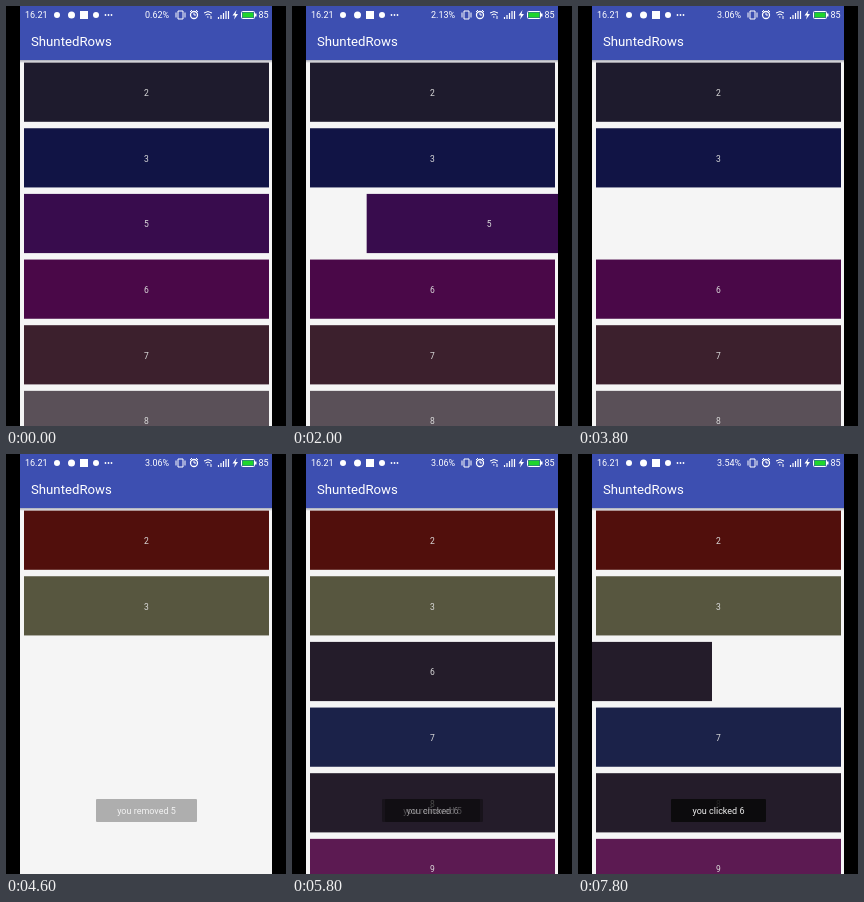
These frames come from a looping animation (280x420 px, 8000 ms). An HTML page:

```html
<!DOCTYPE html>
<html lang="en">
<head>
<meta charset="utf-8">
<style>
  html, body { margin: 0; width: 100%; height: 100%; overflow: hidden; background: #000; }
  svg { display: block; width: 100vw; height: 100vh; font-family: Roboto, sans-serif; }
  .mid { text-anchor: middle; }
  .row text { font-size: 8.5px; fill: #ddd; }
  .toast text { font-size: 9px; fill: #eee; }
  .status { font-size: 9px; fill: #fff; }
  .line { fill: none; stroke: #fff; }
</style>
</head>
<body>
<svg viewBox="0 0 280 420">
  <defs>
    <linearGradient id="shade" x2="0" y2="1">
      <stop stop-color="#a9abb8"/>
      <stop offset="1" stop-color="#f5f5f5"/>
    </linearGradient>
  </defs>
  <rect x="14" width="252" height="420" fill="#f5f5f5"/>
  <rect x="14" y="54" width="252" height="3" fill="url(#shade)"/>
  <g id="list"></g>
  <g id="toasts"></g>
  <rect x="14" width="252" height="54" fill="#3d4fb1"/>
  <text x="25" y="40" font-size="13.2" fill="#fff">ShuntedRows</text>
  <g class="status">
    <text x="19" y="12">16.21</text>
    <circle cx="51" cy="9" r="3"/>
    <circle cx="65.500" cy="9" r="3.500"/>
    <rect x="74" y="5" width="8" height="8"/>
    <circle cx="90" cy="9" r="3"/>
    <circle cx="99.500" cy="9" r=".9"/>
    <circle cx="102.500" cy="9" r=".9"/>
    <circle cx="105.500" cy="9" r=".9"/>
    <text id="rate" x="139" y="12"></text>
    <path class="line" d="M172 5h5v8h-5zM170 6.500v5M179 6.500v5"/>
    <g class="line">
      <circle cx="188" cy="9" r="3.500" stroke-width="1.300"/>
      <path d="M188 7v2h2M184 6l2-2M192 6l-2-2"/>
      <path d="M198 7q4-3 8 0M199.500 9q2.500-2 5 0M201 11h1.500M205 10v3"/>
      <path d="M212.500 13v-2M215 13v-4M217.500 13v-6M220 13v-8M222.500 13v-8" stroke-width="1.200"/>
    </g>
    <path d="M230.500 4l-4 5.500h2.500l-1 4 4-5.500h-2.500z"/>
    <rect class="line" x="235.500" y="5.500" width="13" height="7" rx="1"/>
    <rect x="236.500" y="6.500" width="11" height="5" fill="#1fd52c"/>
    <rect x="249" y="7.500" width="1.500" height="3"/>
    <text x="252.500" y="12">85</text>
  </g>
  <path d="M0 0h14v420H0zM266 0h14v420h-14z"/>
</svg>
<script>
  const $ = id => document.getElementById(id);
  const LEFT = 18, TOP = 56.6, PITCH = 65.65, STEP = 200, LOOP = 8000;

  function add(parent, name, attrs, text = '') {
    const el = document.createElementNS('http://www.w3.org/2000/svg', name);
    for (const k in attrs) el.setAttribute(k, attrs[k]);
    el.textContent = text;
    return parent.appendChild(el);
  }

  function makeRow([label, fill], i) {
    const g = add($('list'), 'g', { class: 'row' });
    const y = TOP + i * PITCH;
    add(g, 'rect', { y, width: 245, height: 59.2, fill });
    add(g, 'text', { x: 122.5, y: y + 33.5, class: 'mid' }, label);
    return g;
  }

  function makeToast(text, width) {
    const g = add($('toasts'), 'g', { class: 'toast' });
    add(g, 'rect', { x: 140.5 - width / 2, y: 345, width, height: 23, rx: 1, fill: '#0a0a0a', 'fill-opacity': .88 });
    add(g, 'text', { x: 140.5, y: 360, class: 'mid' }, text);
    return g;
  }

  const before = [[2, '#1e1b2d'], [3, '#111445'], [5, '#380c4d'],
                  [6, '#4a0848'], [7, '#3c202d'], [8, '#5a5058']].map(makeRow);
  const after = [[2, '#510f0c'], [3, '#57563f'], [6, '#241c2a'],
                 [7, '#1b2249'], [8, '#241c2a'], [9, '#5c1a52']].map(makeRow);
  const removed = makeToast('you removed 5', 101);
  const clicked = makeToast('you clicked 6', 95);

  // Linear interpolation through [time, value] points
  function track(t, pts) {
    if (t <= pts[0][0]) return pts[0][1];
    for (let i = 1; i < pts.length; i++) {
      const [t0, a] = pts[i - 1], [t1, b] = pts[i];
      if (t < t1) return a + (b - a) * (t - t0) / (t1 - t0);
    }
    return pts[pts.length - 1][1];
  }

  const drag5 = [[0, 18], [200, 30], [600, 88], [800, 98], [1200, 56], [1600, 18], [1800, 36],
                 [2400, 152], [2800, 196], [3000, 196], [3800, 270]];
  const drag6 = [[5800, 18], [6000, 30], [6200, 28], [6400, 18], [6600, 14], [7000, -25],
                 [7400, -92], [7600, -109], [7800, -111]];

  const fade = (el, t, from, to) => el.setAttribute('opacity', track(t, [[from, 0], [to, 1]]));
  const fadeOut = (el, t, from, to) => el.setAttribute('opacity', track(t, [[from, 1], [to, 0]]));
  const move = (el, x) => el.setAttribute('transform', `translate(${x} 0)`);

  function draw(now) {
    const t = Math.floor(now % LOOP / STEP) * STEP;
    before.forEach((row, i) => {
      move(row, i == 2 ? track(t, drag5) : LEFT);
      fadeOut(row, t, 4000, 4600);
    });
    after.forEach((row, i) => {
      move(row, i == 2 ? track(t, drag6) : LEFT);
      i < 2 ? fade(row, t, 4000, 4600) : fade(row, t, 4600, 5400);
    });
    removed.setAttribute('opacity', track(t, [[4400, 0], [4600, .34], [5000, 1], [5600, 1], [6000, 0]]));
    fade(clicked, t, 5600, 6000);
    $('rate').textContent = t < 600 ? '0.62%' : t < 2600 ? '2.13%' : t < 6200 ? '3.06%' : '3.54%';
    requestAnimationFrame(frame);
  }

  const start = performance.now();
  const frame = () => draw(performance.now() - start);
  frame();
</script>
</body>
</html>
```
